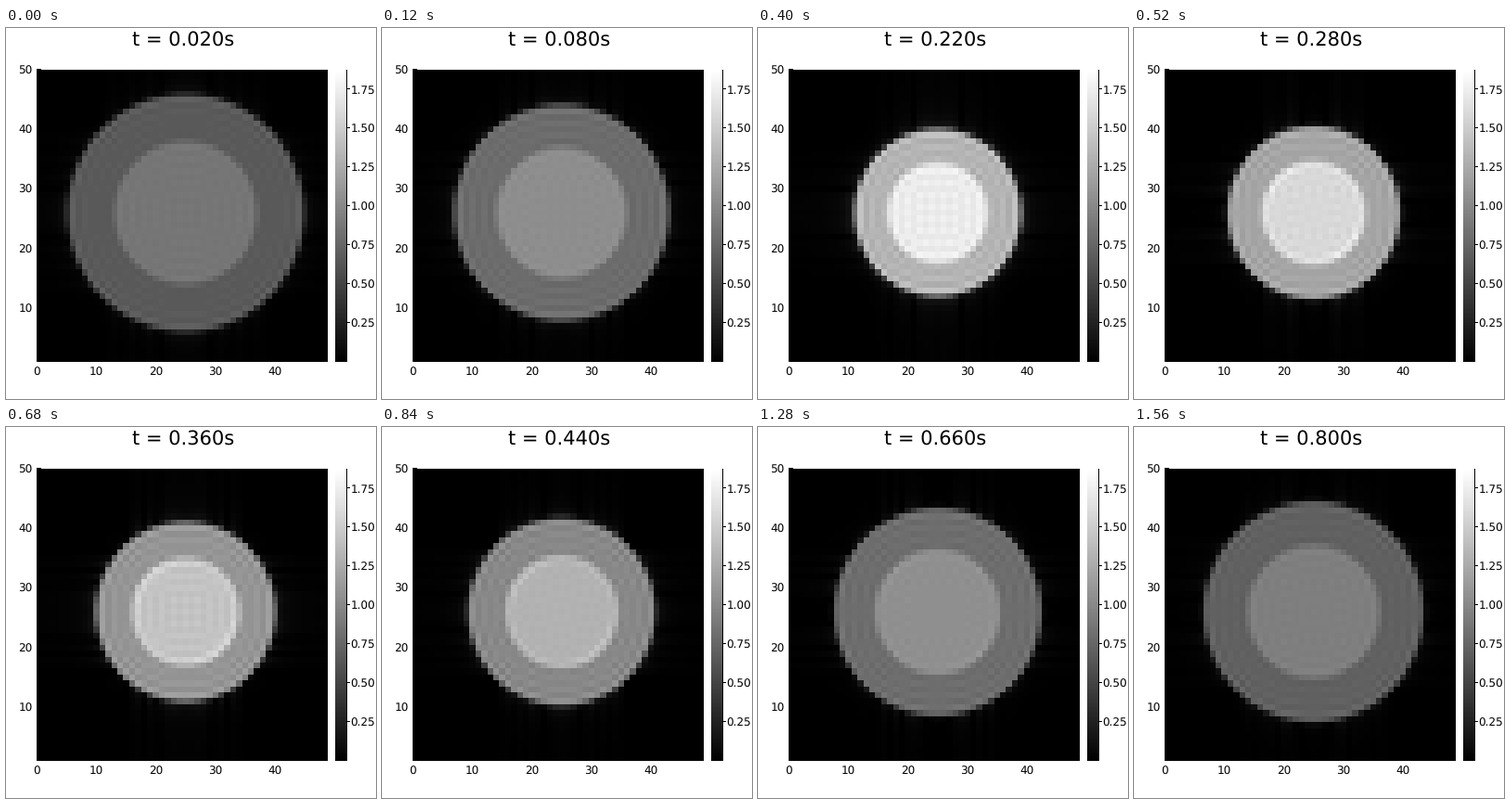
Write a matplotlib script that moves like this. It is 399 px wide and 400 px high and loops after 1600 ms.

```python
import numpy as np
import matplotlib.pyplot as plt
from matplotlib.animation import FuncAnimation

W, H, DPI = 399, 400, 100
FRAMES, INTERVAL = 40, 40
N, FINE = 50, 8                      # image cells and oversampling per cell
LEFT, RIGHT, TOP, BOTTOM = 33, 347, 45, 360
CELL_X = (RIGHT - LEFT) / (N - 1)
CELL_Y = (BOTTOM - TOP) / (N - 1)
X0 = LEFT + 0.5                      # where the first cell is centred
R_MAX, R_MIN, INNER = 19.95, 14.1, 0.6
SYSTOLE, DIASTOLE = 10, 38           # frames of contraction and relaxation
RING_GRAY, CORE_GRAY = 0.353, 0.461


def grid(n, step):
    c = (np.arange(n) - n // 2) * step
    return np.meshgrid(c, c)


FX, FY = grid(N * FINE, 1 / FINE)
FINE_R = np.hypot(FX, FY)
CX, CY = grid(N, 1)
CELL_R = np.hypot(CX, CY)
DIAGONAL = 0.4 + 0.6 * np.clip(-np.sin(2 * np.arctan2(CY, CX)), 0, 1)

# cell shown at each screen column and row of the plot
COLS = np.rint((np.arange(LEFT, RIGHT) + 0.5 - X0) / CELL_X).astype(int)
ROWS = np.rint((BOTTOM - np.arange(TOP, BOTTOM) - 0.5) / CELL_Y).astype(int)


def disc(radius):
    return np.clip((radius - FINE_R) * FINE + 0.5, 0, 1)


def low_pass(img):
    """Keep only the N x N central k-space samples, as a scanner would."""
    k = np.fft.fftshift(np.fft.fft2(np.fft.ifftshift(img)))
    mid, half = N * FINE // 2, N // 2
    k = k[mid - half:mid + half, mid - half:mid + half]
    out = np.fft.fftshift(np.fft.ifft2(np.fft.ifftshift(k)))
    return np.abs(out) / FINE**2


def heart(i):
    relaxing = max(0, i - SYSTOLE)
    u = 1 - relaxing / DIASTOLE if relaxing else i / SYSTOLE
    outer = R_MAX + (R_MIN - R_MAX) * u
    inner = INNER * outer
    saturation = 1 - 0.07 * (1 - np.exp(-relaxing / 8))
    density = saturation * (R_MAX / outer) ** 2
    img = RING_GRAY * disc(outer) + (CORE_GRAY - RING_GRAY) * disc(inner)
    img = low_pass(img * density)
    # motion artefact, strongest along the diagonal of the inner wall
    amp = 0.16 * max(0, u - 0.22) * min(1, relaxing / 5)
    wall = np.exp(-((CELL_R - inner + 0.6) / 0.75) ** 2)
    return img * (1 + amp * DIAGONAL * wall)


def to_screen(cells):
    return cells[np.ix_(ROWS, COLS)]


def points(px):
    return px * 72 / DPI


plt.rcParams.update({"font.family": "DejaVu Sans", "text.hinting": "none",
                     "text.hinting_factor": 1})
fig = plt.figure(figsize=(W / DPI, H / DPI), dpi=DPI, facecolor="white")

gray = dict(cmap="gray", vmin=0, vmax=1, origin="upper")
image = fig.figimage(to_screen(heart(0)), xo=LEFT, yo=H - BOTTOM, **gray)
ramp = np.linspace(1, 0, BOTTOM - TOP)[:, None]
fig.figimage(np.repeat(ramp, 12, axis=1), xo=355, yo=H - BOTTOM, **gray)

ax = fig.add_axes([0, 0, 1, 1])
ax.axis("off")
ax.set_xlim(0, W)
ax.set_ylim(H, 0)


def stroke(x1, y1, x2, y2):
    ax.plot([x1, x2], [y1, y2], color="black", lw=points(1),
            solid_capstyle="butt", snap=False)


def label(x, y, text, ha, px=12):
    return ax.text(x, y, text, fontsize=points(px), ha=ha, va="baseline",
                   color="black")


for v in range(0, 50, 10):
    label(X0 + v * CELL_X, 374.7, str(v), "center")
for v in range(10, 51, 10):
    label(28.5, BOTTOM - (v - 1) * CELL_Y + 4.7, str(v), "right")
stroke(LEFT, TOP - 0.5, LEFT + 5, TOP - 0.5)

stroke(367.5, TOP, 367.5, BOTTOM)
for n in range(1, 8):
    y = BOTTOM - 42 * n
    stroke(367, y - 0.5, 371, y - 0.5)
    label(371.5, y + 4.5, f"{n / 4:.2f}", "left")

title = label(191, 18.5, "", "center", 21)


def update(i):
    image.set_data(to_screen(heart(i)))
    title.set_text(f"t = {0.02 * (i + 1):.3f}s")
    return image, title


anim = FuncAnimation(fig, update, frames=FRAMES, interval=INTERVAL,
                     repeat=True, repeat_delay=0, blit=False)
plt.show()
```
